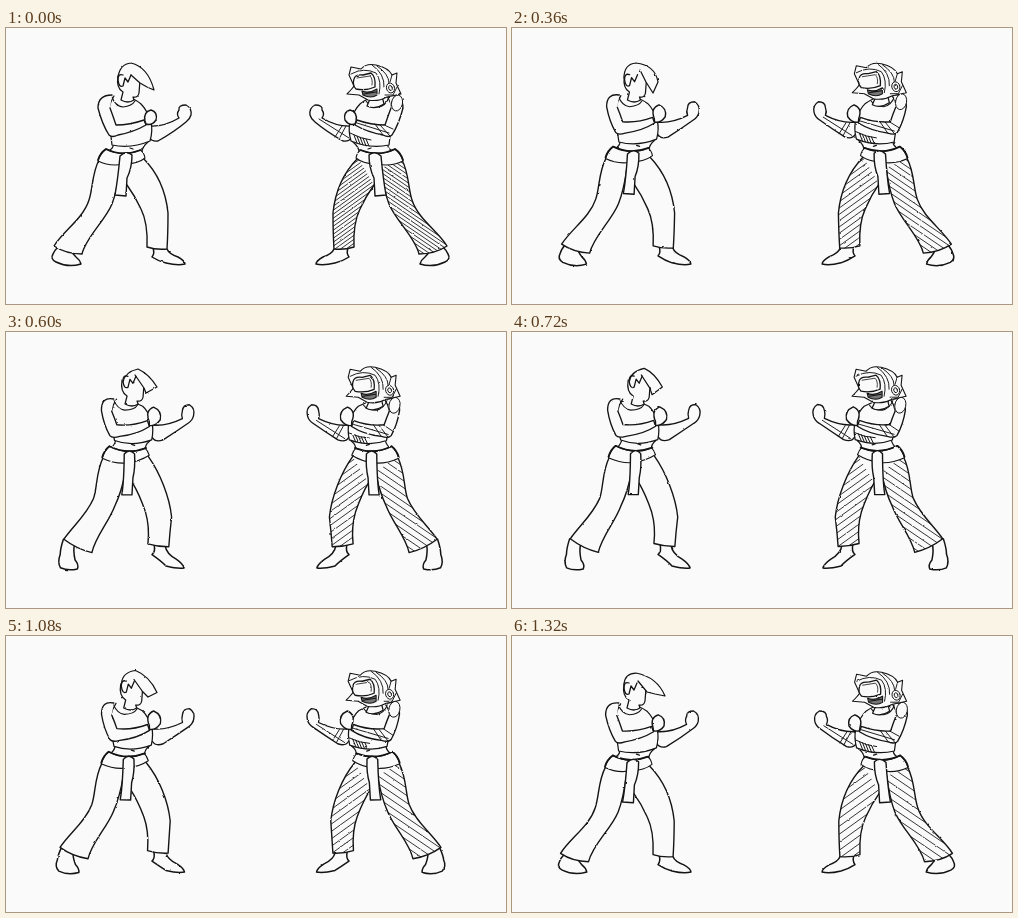
An HTML page with a canvas for the animation above (1.44 s loop, 500 px wide and 276 px high).

```html
<!DOCTYPE html>
<html lang="en">
<head>
<meta charset="utf-8">
<title>Sparring stance</title>
<style>
  html, body { margin: 0; width: 100%; height: 100%; overflow: hidden; background: #fafafa; }
  canvas { display: block; width: 100vw; height: 100vh; filter: url(#rough); }
  svg { position: absolute; width: 0; height: 0; }
</style>
</head>
<body>
<canvas id="stage"></canvas>
<svg aria-hidden="true">
  <filter id="rough" x="0" y="0" width="1" height="1" color-interpolation-filters="sRGB">
    <feTurbulence id="noise" type="fractalNoise" baseFrequency=".22" numOctaves="2" seed="1"/>
    <feDisplacementMap in="SourceGraphic" scale="1.8" xChannelSelector="R" yChannelSelector="G"/>
  </filter>
</svg>
<script>
const W = 500, H = 276, STEP = 120, STEPS = 12, MIRROR = 489;
const PAPER = '#fafafa', INK = '#141414';
const canvas = document.getElementById('stage');
const noise = document.getElementById('noise');
const ctx = canvas.getContext('2d');
const dpr = window.devicePixelRatio || 1;
canvas.width = W * dpr;
canvas.height = H * dpr;

// Pose amounts at the key steps: 0 is the low stance, 1 the raised one.
const keys = [0, 1, 3, 5, 8, 10, 11, 12];
const curves = {
  legs: [0, .05, .15, .9, 1, .1, .05],
  body: [0, .12, .3, .85, 1, .32, .2],
  arms: [0, .35, .65, .85, 1, .75, .4],
  head: [0, 0, .1, .9, 1, .2, 0],
  gap: [4, 5, 6.3, 7, 7.4, 7.4, 8]
};
const hair = [
  [112, 49, 114, 36, 125, 35, 142, 39, 148, 62, 141, 59, 134, 55, 125, 47],
  [112, 50, 114, 35, 127, 38, 144, 40, 146, 61, 141, 58, 134, 56, 126, 46],
  [112, 50, 112, 36, 124, 35, 143, 37, 146, 54, 141, 65, 134, 54, 128, 42],
  [117, 50, 119, 40, 132, 37, 143, 42, 151, 55, 140, 61, 138, 56, 129, 43],
  [118, 48, 119, 37, 133, 35, 143, 40, 149, 55, 140, 66, 138, 57, 130, 43],
  [113, 47, 114, 35, 126, 34, 144, 40, 153, 58, 144, 56, 135, 54, 126, 44],
  [112, 48, 113, 37, 124, 37, 145, 41, 153, 60, 143, 58, 135, 56, 126, 45]
];

// Each part holds its low and raised outline.
const parts = {
  backFoot: [
    'M52 219 Q48 223 47 226 Q44 231 50 234 Q62 240 75 236 Q74 232 70 229 Q66 225 65 222',
    'M58 206 Q55 216 55 222 Q52 230 55 236 Q62 239 71 237 Q73 233 69 228 Q67 218 69 211'],
  frontFoot: [
    'M147 220 Q149 225 146 229 Q152 233 160 235 Q172 238 179 236 Q179 233 172 229 Q163 226 161 221',
    'M148 211 Q150 219 146 222 Q156 229 160 234 Q172 237 178 236 Q177 232 170 227 Q160 221 159 213'],
  frontLeg: [
    'M137 130 C152 145 160 165 162 185 Q162 205 161 221 Q150 222 141 219 Q142 195 135 181 Q129 168 121 157',
    'M143 124 C154 140 164 165 166 185 Q164 200 163 214 Q152 214 142 211 Q144 195 140 180 Q134 162 127 150'],
  backLeg: [
    'M93 132 C86 145 87 160 83 172 C77 191 57 203 48 218 Q60 226 76 226 C80 209 99 193 106 176 Q111 163 114 140',
    'M98 124 C90 140 92 155 88 166 C81 182 69 192 59 206 Q72 216 87 220 C90 205 103 190 109 174 Q116 160 120 140'],
  waist: [
    'M107 117 Q108 120 101 124 M142 114 Q136 119 136 124 M124 120 L127 121',
    'M110 107 Q109 112 104 116 M144 108 Q139 112 140 117 M126 111 L129 112'],
  belt: [
    'M100 121 Q94 126 92 133 Q104 139 118 136 Q132 136 139 130 Q138 124 134 122 Q118 130 100 121',
    'M104 113 Q99 118 97 125 Q110 131 122 130 Q134 128 144 122 Q142 117 140 115 Q124 123 104 113'],
  beltTop: ['M92 132 Q94 125 100 121 Q116 129 135 122', 'M97 124 Q99 117 104 113 Q122 122 141 115'],
  beltEnd: [
    'M114 128 Q120 122 126 127 Q126 140 121 150 L120 168 L109 167 Q112 150 114 128 Z',
    'M119 121 Q124 115 129 121 Q130 135 128 145 L127 162 L117 162 Q119 150 119 121 Z'],
  torso: [
    'M108 68 Q100 80 104 100 L106 117 Q125 121 144 113 Q147 103 145 94 Q141 82 135 76 Q130 72 127 71',
    'M111 67 Q103 78 106 95 L109 107 Q126 114 146 107 Q148 97 146 89 Q142 78 137 74 Q132 72 130 71'],
  neckline: ['M106 69 Q109 78 117 79 Q126 78 129 73', 'M108 68 Q112 77 119 78 Q129 78 132 73'],
  farArm: [
    'M143 98 Q158 99 173 90 Q170 86 173 82 Q172 77 180 77 Q186 80 185 87 Q184 91 180 94 Q168 104 152 113 Q146 114 143 109',
    'M146 92 Q160 94 177 86 Q176 82 177 78 Q178 72 184 72 Q190 76 188 83 Q187 88 182 91 Q170 99 158 107 Q150 110 147 105'],
  nearArm: [
    'M106 67 Q92 67 92 80 Q96 96 103 107 Q106 110 112 107 Q128 104 140 97 L138 92 Q124 97 110 97 Q107 88 104 80',
    'M108 67 Q96 64 96 78 Q98 92 104 103 Q106 106 114 104 Q132 102 144 94 L142 88 Q126 94 111 92 Q109 86 106 79'],
  nearFist: [
    'M139 93 Q137 84 145 82 Q152 84 150 92 Q146 98 140 96 Z',
    'M144 89 Q139 78 148 74 Q157 78 155 87 Q150 94 144 93 Z'],
  joints: [
    'M102 101 L111 97 M105 108 L115 97 M112 107 L120 96 M106 105 L138 95 M149 98 L156 111 M153 98 L160 109 M146 110 L176 91',
    'M102 99 L112 92 M107 105 L116 93 M114 104 L122 92 M107 102 L142 92 M152 93 L159 106 M156 93 L163 104 M151 106 L179 88'],
  hem: [
    'M126 118 L129 111 M129 118 L132 110 M132 117 L135 109 M135 116 L138 108 M138 115 L141 107 M124 112 Q134 111 145 105',
    'M128 110 L131 104 M131 110 L134 104 M134 110 L137 103 M137 109 L140 102 M140 108 L143 101 M126 105 Q136 105 147 100']
};
const face = 'M112 48 Q110 60 117 64 L115 72 Q122 76 128 72 L127 69 Q132 70 133 65 L134 52';
const ear = 'M117 47 Q112 45 112 52 Q113 60 117 58 L119 50 L122 54 L125 47';
const neck = 'M364 71 L361 78 Q369 82 378 76 L376 68';
const helmet = 'M343 47 L345 39 L355 41 Q360 35 370 37 Q383 40 386 47 L391 45 L390 55 L395 66 L381 69 Q372 74 362 72 L353 67 L341 66 Q346 61 348 58 Z';
const visor = 'M348 51 Q349 46 357 47 L365 45 Q370 49 369 59 Q360 63 350 61 Q346 57 348 51 Z';
const trim = 'M345 46 Q358 39 370 45 Q376 53 373 66 M366 37 Q379 46 378 59 M371 38 Q383 46 383 55 M379 67 L387 67 L391 59 M386 47 L384 54 M351 50 L364 48 Q367 51 366 57';
const jaw = 'M356 63 Q363 66 371 61 L371 67 Q365 71 357 67 Z M358 66 L370 64';

const mix = (a, b, k) => a + (b - a) * k;

function locate(step) {
  const i = keys.findIndex((k, n) => step >= k && step < keys[n + 1]);
  return { i, next: (i + 1) % hair.length, k: (step - keys[i]) / (keys[i + 1] - keys[i]) };
}

function morph([low, high], k) {
  const ends = high.match(/\d+/g);
  let n = 0;
  return low.replace(/\d+/g, v => mix(+v, +ends[n++], k).toFixed(2));
}

function draw(d, width = 1.25, fill = PAPER) {
  const path = new Path2D(d);
  if (fill) { ctx.fillStyle = fill; ctx.fill(path); }
  ctx.lineWidth = width;
  ctx.stroke(path);
}
const line = (d, width) => draw(d, width, null);

function oval(x, y, rx, ry, turn = 0, width = 1) {
  ctx.beginPath();
  ctx.ellipse(x, y, rx, ry, turn, 0, Math.PI * 2);
  ctx.fillStyle = PAPER;
  ctx.fill();
  ctx.lineWidth = width;
  ctx.stroke();
}

function hatch(d, x, w, top, bottom, slope, gap) {
  ctx.save();
  ctx.clip(new Path2D(d));
  ctx.beginPath();
  for (let y = top, n = 0; y < bottom; y += gap, n++) {
    const inset = 1 + (n * 7 % 4);
    ctx.moveTo(x + inset, y + inset * slope);
    ctx.lineTo(x + w, y + w * slope);
  }
  ctx.lineWidth = .85;
  ctx.stroke();
  ctx.restore();
}

function drawBody(pose, robot) {
  const part = (name, group) => morph(parts[name], pose[group]);
  draw(part('backFoot', 'legs'), 1.5);
  draw(part('frontFoot', 'legs'), 1.5);
  for (const [name, x, w, top, slope] of [['frontLeg', 117, 52, 110, .72], ['backLeg', 44, 78, 160, -.68]]) {
    const d = part(name, 'legs');
    draw(d, 1.4);
    if (robot) hatch(d, x, w, top, 290, slope, pose.gap);
  }
  line(part('waist', 'body'));
  draw(part('belt', 'body'), 1.1);
  line(part('beltTop', 'body'), 1.8);
  draw(part('beltEnd', 'body'), 1.4);
  draw(part('farArm', 'arms'), 1.35);
  draw(part('torso', 'body'));
  if (robot) line(part('hem', 'body'), 1);
  line(part('neckline', 'body'), 1.1);
  draw(part('nearArm', 'arms'), 1.35);
  if (robot) {
    line(part('joints', 'arms'), .95);
    const a = pose.arms;
    oval(mix(98, 101, a), mix(75, 73, a), 5.5, 8, -.2);
  }
  draw(part('nearFist', 'arms'), 1.4);
}

function drawHead(pose) {
  ctx.save();
  ctx.translate(pose.head * 4.5, 0);
  draw(face);
  ctx.restore();
  const h = pose.hair;
  const at = n => h[n * 2] + ' ' + h[n * 2 + 1];
  draw(`M${at(0)} Q${at(1)} ${at(2)} Q${at(3)} ${at(4)} L${at(5)} L${at(6)} L${at(7)}`);
  ctx.save();
  ctx.translate(pose.head * 5.5, pose.head * -3);
  line(ear, 1.3);
  ctx.restore();
}

function drawHelmet(pose) {
  ctx.save();
  ctx.translate(pose.arms * -1, pose.arms * -2);
  draw(neck);
  draw(helmet, 1.1);
  line(trim, .95);
  draw(visor, 1.3);
  line('M351 50 L364 48 Q367 51 366 57', .8);
  draw(jaw, 1.1, '#777');
  oval(384.5, 60, 4, 5, -.3);
  oval(384.5, 60, 1.8, 2.5, -.3);
  ctx.restore();
}

function render(step) {
  const { i, next, k } = locate(step);
  const pose = { hair: hair[i].map((v, n) => mix(v, hair[next][n], k)) };
  for (const name in curves) pose[name] = mix(curves[name][i], curves[name][next], k);
  noise.setAttribute('seed', step + 1);
  ctx.setTransform(dpr, 0, 0, dpr, 0, 0);
  ctx.fillStyle = PAPER;
  ctx.fillRect(0, 0, W, H);
  ctx.strokeStyle = INK;
  ctx.lineCap = ctx.lineJoin = 'round';
  drawBody(pose, false);
  drawHead(pose);
  ctx.save();
  ctx.translate(MIRROR, 0);
  ctx.scale(-1, 1);
  drawBody(pose, true);
  ctx.restore();
  drawHelmet(pose);
}

const start = performance.now();
let shown = -1;
function tick() {
  const step = Math.floor((performance.now() - start) / STEP) % STEPS;
  if (step !== shown) render(shown = step);
  requestAnimationFrame(tick);
}
tick();
</script>
</body>
</html>
```
